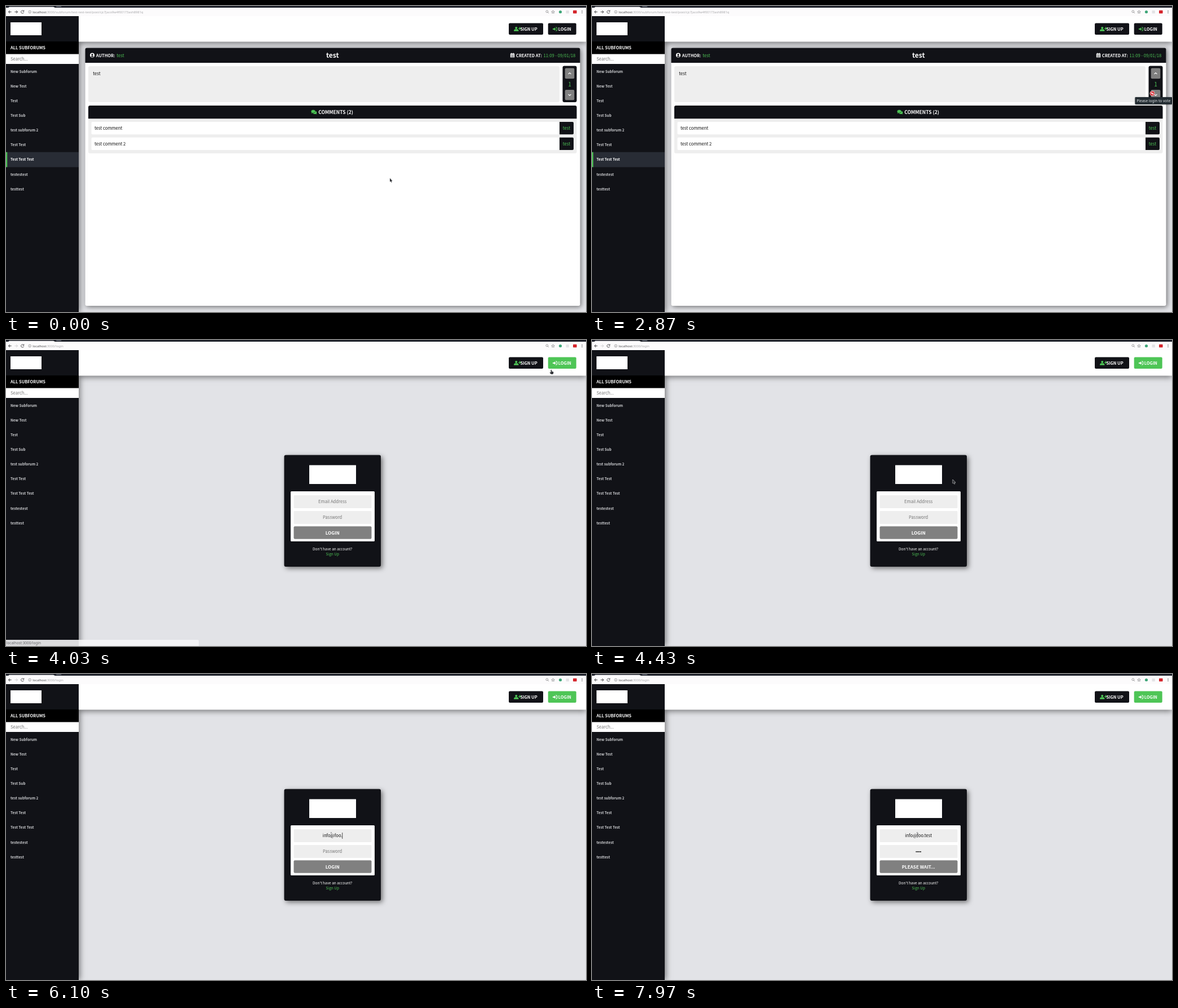
Animation of 1029 by 544 pixels, one loop 8000 ms. Source, as an HTML page with a canvas:

```html
<!DOCTYPE html>
<html lang="en">
<head>
<meta charset="utf-8">
<title>Forum login</title>
<style>
html, body { margin: 0; width: 100%; height: 100%; overflow: hidden; background: #e2e3e7; }
canvas { display: block; }
</style>
</head>
<body>
<canvas id="stage" width="1029" height="544"></canvas>
<script>
const ctx = document.getElementById('stage').getContext('2d');
const LOOP = 8000;
const DARK = '#111217', GREEN = '#4ec556', PALE = '#eeeeee', GREY = '#808080', WHITE = '#ffffff';
const SANS = '"Noto Sans CJK JP", "Noto Sans CJK SC", "Noto Sans CJK", "Noto Sans", sans-serif';
const UI = '"Noto Sans", "Open Sans", sans-serif';
const BODY = 7.67, HEAD = 7.45;

const NAV = 3960, SWAP = 4025, FOCUS = 4720, TAB = 6470, SUBMIT = 7130;
const EMAIL = 'info@foo.test';
const emailTimes = [5130, 5200, 5270, 5330, 5630, 5800, 5890, 5970, 6060, 6150, 6230, 6370, 6420];
const dotTimes = [6670, 6830, 6900, 6980];
const forums = ['New Subforum', 'New Test', 'Test', 'Test Sub', 'test subforum 2',
  'Test Test', 'Test Test Test', 'testestest', 'testtest'];

// Pointer stops: time, x, y
const path = [
  [230, 681, 306], [1030, 991.5, 120], [1070, 992, 120], [1230, 995, 119],
  [2100, 995, 119], [2470, 994, 155.5], [3270, 994, 155.5], [3800, 979, 44],
  [3980, 976, 46], [4000, 976, 46], [4030, 968.5, 52], [4700, 577, 286]
];

const clamp = v => Math.max(0, Math.min(1, v));
const ramp = (t, from, to) => clamp((t - from) / (to - from));
const within = (t, from, to) => t >= from && t < to;
const countPast = (times, t) => times.filter(s => t >= s).length;

function mix(a, b, k) {
  const part = (hex, i) => parseInt(hex.slice(i, i + 2), 16);
  return `rgb(${[1, 3, 5].map(i => Math.round(part(a, i) + (part(b, i) - part(a, i)) * k))})`;
}

function pointerAt(t) {
  const i = path.findIndex(p => p[0] > t);
  if (i === 0) return path[0].slice(1);
  if (i < 0) return path[path.length - 1].slice(1);
  const [t0, x0, y0] = path[i - 1], [t1, x1, y1] = path[i];
  const k = ramp(t, t0, t1);
  const e = t0 === 4030 ? 1 - (1 - k) ** 2 : k * k * (3 - 2 * k);
  return [x0 + (x1 - x0) * e, y0 + (y1 - y0) * e];
}

function box(x, y, w, h, color, radius = 0, shadow) {
  ctx.save();
  if (shadow) {
    [ctx.shadowOffsetX, ctx.shadowOffsetY, ctx.shadowBlur] = shadow;
    ctx.shadowColor = 'rgba(0,0,0,.5)';
  }
  ctx.fillStyle = color;
  ctx.beginPath();
  ctx.roundRect(x, y, w, h, radius);
  ctx.fill();
  ctx.restore();
}

function disc(x, y, r, color) {
  ctx.fillStyle = color;
  ctx.beginPath();
  ctx.arc(x, y, r, 0, 7);
  ctx.fill();
}

function line(d, color, width = 1) {
  ctx.strokeStyle = color;
  ctx.lineWidth = width;
  ctx.stroke(new Path2D(d));
}

// y is the middle of the capitals
function text(str, x, y, size, color, { bold = false, align = 'left', font = SANS } = {}) {
  ctx.font = `${bold ? 'bold ' : ''}${size}px ${font}`;
  ctx.textAlign = align;
  ctx.fillStyle = color;
  ctx.fillText(str, x, y + size * 0.365);
  return ctx.measureText(str).width;
}

function at(x, y, draw) {
  ctx.save();
  ctx.translate(x, y);
  draw();
  ctx.restore();
}

function fillPath(d, color) {
  ctx.fillStyle = color;
  ctx.fill(new Path2D(d));
}

function personIcon(x, y) {
  at(x, y, () => {
    disc(0, 0, 4, WHITE);
    disc(0, -1, 1.6, DARK);
    fillPath('M-2.6 2.4Q-2 .8 0 .9Q2 .8 2.6 2.4Q0 4 -2.6 2.4', DARK);
  });
}

function addUserIcon(x, y) {
  at(x, y, () => {
    disc(-1.8, -2, 2, GREEN);
    fillPath('M-6 3.8V2.4Q-5.6 .2 -3.4 .2H-.2Q2 .2 2.4 2.4V3.8Z', GREEN);
    line('M2.2 -1H7M4.6 -3.4V1.4', GREEN, 1.3);
  });
}

function enterIcon(x, y, color) {
  at(x, y, () => {
    fillPath('M-4 -1.1H-1.3V-3L1.7 0L-1.3 3V1.1H-4Z', color);
    line('M1 -3H2.4Q3.6 -3 3.6 -1.8V1.8Q3.6 3 2.4 3H1', color, 1.1);
  });
}

function calendarIcon(x, y) {
  at(x, y, () => {
    box(-3.7, -3.2, 7.4, 7.2, WHITE, 0.6);
    box(-2.3, -4.2, 1.2, 2, WHITE);
    box(1.1, -4.2, 1.2, 2, WHITE);
    line('M-3 -1H3M-3 1.2H3M-3 3.2H3M-1.1 -1V3.3M1.1 -1V3.3', DARK, 0.45);
  });
}

function chatIcon(x, y) {
  at(x, y, () => {
    ctx.fillStyle = GREEN;
    ctx.beginPath();
    ctx.ellipse(1.6, 0.9, 3.4, 2.6, 0, 0, 7);
    ctx.fill();
    fillPath('M2.5 3L5 4.3L4 2Z', GREEN);
    ctx.beginPath();
    ctx.ellipse(-1.2, -1.2, 3.9, 2.9, 0, 0, 7);
    ctx.fill();
    ctx.lineWidth = 0.5;
    ctx.strokeStyle = DARK;
    ctx.stroke();
    fillPath('M-3.8 .4L-4.6 2.6L-1.6 1.4Z', GREEN);
  });
}

function browserBar(t) {
  box(0, 0, 1029, 18, '#fcfbfc');
  box(0, 0, 1029, 3, '#1d2029');
  fillPath('M4 3L6 1.4H84L87 3Z', '#f4f4f5');
  fillPath('M88 0H97L99 2H90Z', '#565b66');
  const ink = '#4a4a4d';
  const forward = t < NAV || t >= 7970 ? ink : '#d2d2d4';
  line('M9.6 10.5H4.4M7 7.9L4.4 10.5L7 13.1', ink, 1);
  line('M15.4 10.5H20.6M18 7.9L20.6 10.5L18 13.1', forward, 1);
  line('M31.3 9A2.6 2.6 0 1 0 31.7 11.2M31.8 7.4V9.5H29.7', ink, 0.9);
  line('M39.8 10.5a2.4 2.4 0 1 0 4.8 0a2.4 2.4 0 1 0 -4.8 0M42.2 10V12M42.2 8.8V9.4', '#77777a', 0.6);
  const host = text('localhost', 47.3, 10.5, 5.73, '#4c4c4f', { font: UI });
  const rest = t < NAV ? ':3000/subforum/test-test-test/post/cjc7jaco9w4f00173ash8981q' : ':3000/login';
  text(rest, 47.3 + host, 10.5, 5.73, '#a9a9ac', { font: UI });
  line('M957.9 9.8a1.9 1.9 0 1 0 3.8 0a1.9 1.9 0 1 0 -3.8 0M961.2 11.2L963 13', '#77777a', 0.7);
  line('M970.5 7.8L971.3 9.6L973.2 9.8L971.8 11L972.2 13L970.5 12L968.8 13L969.2 11L967.8 9.8L969.7 9.6Z', '#66666a', 0.6);
  disc(983.5, 10.5, 2.6, '#3fa679');
  box(993.5, 8, 5.4, 5.2, '#e3e3e5', 0.6);
  box(1006, 7.8, 6.6, 5.4, '#d5242b', 0.8);
  [8.4, 10.5, 12.6].forEach(y => disc(1022, y, 0.65, ink));
}

function sidebar(t) {
  box(0, 18, 129, 526, DARK);
  box(8, 29, 55, 23, WHITE);
  box(0, 63, 129, 22.5, '#000000');
  text('ALL SUBFORUMS', 8, 74.3, HEAD, WHITE, { bold: true });
  box(0, 85.5, 129, 17.5, WHITE);
  text('Search...', 8, 94, BODY, '#757575');
  forums.forEach((name, i) => {
    const y = 116.2 + i * 26.15;
    const active = i === 6 && t < NAV;
    if (active) {
      box(0, y - 13.3, 129, 26.6, '#282c35');
      box(0, y - 13.3, 2.2, 26.6, GREEN);
    }
    text(name, 8, y, 6.4, active ? WHITE : '#cfd0d3', { bold: true });
  });
}

function header(t) {
  box(892, 30.5, 61, 20.5, DARK, 2);
  addUserIcon(907, 41);
  text('SIGN UP', 912.4, 41, HEAD, WHITE, { bold: true });
  const hover = ramp(t, 3680, 3880);
  box(961.7, 30.5, 50, 20.5, mix(DARK, GREEN, hover), 2);
  enterIcon(974, 41, mix(GREEN, WHITE, hover));
  text('LOGIN', 979.8, 41, HEAD, WHITE, { bold: true });
}

function postPage() {
  box(140.5, 74.5, 878, 458.5, WHITE, 3, [2, 2, 9]);
  box(140.5, 74.5, 878, 26.5, DARK, [3, 3, 0, 0]);
  personIcon(153, 87.6);
  text('AUTHOR:', 159.8, 87.8, HEAD, WHITE, { bold: true });
  text('test', 196.3, 87.8, BODY, GREEN);
  text('test', 579.3, 88, 12, WHITE, { bold: true, align: 'center' });
  calendarIcon(898.5, 87.6);
  text('CREATED AT:', 904.8, 87.8, HEAD, WHITE, { bold: true });
  text('11:09 - 09/01/18', 1010.3, 87.8, BODY, GREEN, { align: 'right' });

  box(146, 107, 836, 64, PALE, 3);
  text('test', 154.3, 120.2, BODY, '#111111');
  box(987.5, 106.5, 25, 64.5, DARK, 3);
  box(991.7, 110.5, 16.6, 18.7, GREY, 2);
  box(991.7, 149, 16.6, 18.2, GREY, 2);
  line('M997.6 121L1000 118.8L1002.4 121', WHITE, 1.1);
  line('M997.6 157L1000 159.2L1002.4 157', WHITE, 1.1);
  text('1', 1000, 139.3, 10.2, GREEN, { align: 'center' });

  box(146, 177, 866.5, 85, PALE, 3);
  box(146, 177, 866.5, 23.3, DARK, [3, 3, 0, 0]);
  chatIcon(546.3, 188.5);
  text('COMMENTS (2)', 554.3, 188.7, 8.5, WHITE, { bold: true });
  ['test comment', 'test comment 2'].forEach((comment, i) => {
    const y = 206 + i * 27.8;
    box(151.5, y, 855.5, 22.2, WHITE, 2);
    box(982, y, 25, 22.2, DARK, [0, 2, 2, 0]);
    text(comment, 157, y + 11.2, BODY, '#111111');
    text('test', 994.5, y + 11.2, BODY, GREEN, { align: 'center' });
  });
}

function loginPage(t) {
  const mid = { align: 'center' };
  const caret = (x, y) => box(x, y - 5.5, 0.8, 11, '#222222');
  box(493.5, 204.5, 171.5, 198.5, DARK, 3, [3, 3, 8]);
  box(538, 222.5, 83, 33.5, WHITE);
  box(505, 269, 149, 89, WHITE, 1.5);
  box(510.5, 276, 138, 23, PALE, 1.5);
  box(510.5, 304, 138, 23, PALE, 1.5);

  const typed = EMAIL.slice(0, countPast(emailTimes, t));
  if (t < FOCUS) text('Email Address', 579.2, 287.7, BODY, '#757575', mid);
  else {
    const width = text(typed, 579.2, 287.7, BODY, '#111111', mid);
    if (t < TAB) caret(579 + width / 2, 287.5);
  }

  const dots = countPast(dotTimes, t);
  if (t < TAB) text('Password', 579.2, 315.5, BODY, '#757575', mid);
  else {
    for (let i = 0; i < dots; i++) disc(579.2 + (i - (dots - 1) / 2) * 2.5, 316, 1.05, '#111111');
    if (t < 7500) caret(579.1 + dots * 1.25, 315.5);
  }

  const ready = ramp(t, 6670, 6800) - ramp(t, SUBMIT - 60, 7200);
  box(510.5, 331.3, 138, 22.5, mix(GREY, '#2b2e31', ready), 2);
  text(t < SUBMIT ? 'LOGIN' : 'PLEASE WAIT...', 579.2, 342.8, 8.05, WHITE, { bold: true, align: 'center' });
  text("Don't have an account?", 579.2, 371.5, 6.5, WHITE, mid);
  text('Sign Up', 579.2, 380.7, 6.5, GREEN, mid);
}

function tooltip(y) {
  box(963.5, y, 65.5, 12.8, '#222b31', 1, [0, 0.5, 2]);
  text('Please login to vote', 966.3, y + 6.3, 6.55, '#e3e6e8', { font: UI });
}

function statusBar() {
  ctx.globalAlpha = 0.88;
  box(0, 533, 342, 11, '#f8f8f9', [0, 2, 0, 0]);
  ctx.globalAlpha = 1;
  text('localhost:3000/login', 0.8, 538.8, 6.43, '#66676a', { font: UI });
}

function pointer(t) {
  const [x, y] = pointerAt(t);
  const onVote = t < SWAP && x > 991.7 && x < 1008 && (within(y, 110, 129.3) || within(y, 149, 167));
  const onLogin = x > 962 && x < 1012 && y > 30 && y < 53;
  const onField = t >= SWAP && x > 510 && x < 648 && y > 276 && y < 327;
  const outlined = d => {
    line(d, 'rgba(255,255,255,.85)', 1);
    fillPath(d, '#34363a');
  };
  at(x, y, () => {
    if (onVote) {
      disc(0, 0, 4.5, WHITE);
      disc(0, 0, 4, '#d9434a');
      line('M-2.4 -1.4L2.4 1.4', WHITE, 1.5);
    } else if (onField) {
      line('M-1.3 -4.3H1.3M0 -4.3V4.3M-1.3 4.3H1.3', '#77787b', 0.7);
    } else if (onLogin) {
      outlined('M-.8 .5Q0 -.6 .8 .5V3L3.6 3.8Q4.3 4.2 4 5.2L3.3 8H-.6L-2.7 5.2Q-2.4 4 -.8 5Z');
    } else {
      outlined('M0 0V6.6L1.5 5.4L2.6 7.8L3.7 7.3L2.7 5H4.6Z');
    }
  });
}

function draw(t) {
  box(0, 0, 1029, 544, '#e2e3e7');
  if (t < SWAP) postPage();
  else loginPage(t);
  box(0, 18, 129, 526, DARK, 0, [2, 0, 10]);
  box(129, 18, 900, 45.5, WHITE, 0, [0, 2, 10]);
  sidebar(t);
  header(t);
  browserBar(t);
  if (within(t, 1570, 2100)) tooltip(125.5);
  if (within(t, 2870, 3270)) tooltip(162);
  if (within(t, 3750, 4130)) statusBar();
  pointer(t);
}

function tick() {
  draw(performance.now() % LOOP);
  requestAnimationFrame(tick);
}
tick();
</script>
</body>
</html>
```
